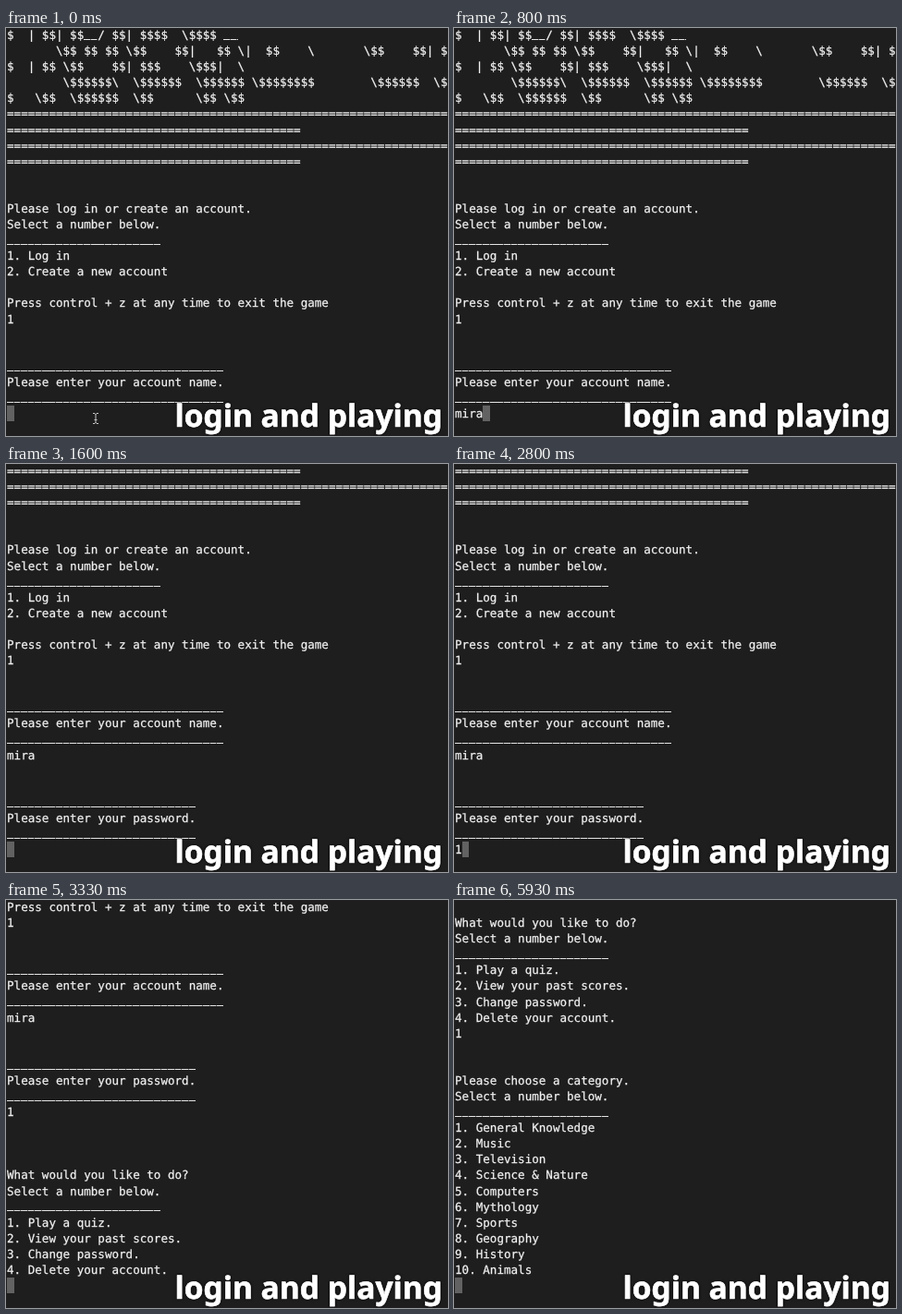
Write an HTML page that moves like this. It is 478x442 px and loops after 8000 ms.

```html
<!DOCTYPE html>
<html lang="en">
<head>
<meta charset="utf-8">
<title>Terminal quiz login</title>
<style>
  html, body { margin: 0; width: 100%; height: 100%; overflow: hidden; background: #1e1e1e; }
  #stage { position: relative; width: 478px; height: 442px; overflow: hidden; background: #1e1e1e; }
  #term {
    position: absolute; left: 1px; top: -0.92px; margin: 0;
    font: 12.57px/17.08px "DejaVu Sans Mono", monospace;
    color: #f2f2f2; -webkit-text-stroke: 0.25px #f2f2f2; text-rendering: geometricPrecision;
  }
  /* underscores sit near the baseline, with a small gap between them */
  #term u {
    text-decoration: none; color: transparent; -webkit-text-stroke: 0;
    background: repeating-linear-gradient(90deg, #e4e4e4 0 6.7px, #777 6.7px 7.57px) 0 11.9px / 100% 1.4px no-repeat;
  }
  #term i { display: inline-block; width: 7.5px; height: 17px; vertical-align: top; background: #626262; }
  svg { position: absolute; left: 0; top: 0; }
  #title {
    font: bold 33.5px "Noto Sans", sans-serif; fill: #fff;
    stroke: #fff; stroke-width: 0.7px; stroke-linejoin: round;
    filter: drop-shadow(0 0 1.5px #000); text-rendering: geometricPrecision;
  }
  #mouse { fill: none; stroke: #c8c8c8; }
</style>
</head>
<body>
<div id="stage">
  <pre id="term"></pre>
  <svg width="478" height="442">
    <path id="mouse" d="M94 417.5h2l1 1 1-1h2M97 418v10M94 428.5h2l1-1 1 1h2M95.5 424.5h3"/>
    <text id="title" x="182.5" y="431.5">login and playing</text>
  </svg>
</div>
<script>
const LOOP = 8000, ROWS = 24;
const rule = n => '_'.repeat(n);
const wide = ['='.repeat(63), '='.repeat(42)];
const select = ['Select a number below.', rule(22)];
const numbered = names => names.map((name, i) => `${i + 1}. ${name}`);
const ask = (what, answer) => {
  const text = `Please enter your ${what}.`;
  return [rule(text.length), text, rule(text.length), answer];
};

const banner = String.raw`$  | $$| $$__/ $$| $$$$  \$$$$ __
       \$$ $$ $$ \$$    $$|   $$ \|  $$    \       \$$    $$| $
$  | $$ \$$    $$| $$$    \$$$|  \
        \$$$$$$\  \$$$$$$  \$$$$$$ \$$$$$$$$        \$$$$$$  \$
$   \$$  \$$$$$$  \$$      \$$ \$$`.split('\n');

const lines = [
  ...banner, ...wide, ...wide, '', '',
  'Please log in or create an account.', ...select,
  ...numbered(['Log in', 'Create a new account']), '',
  'Press control + z at any time to exit the game', '1', '', '',
  ...ask('account name', 'mira'), '', '',
  ...ask('password', '1'), '', '', '',
  'What would you like to do?', ...select,
  ...numbered(['Play a quiz.', 'View your past scores.', 'Change password.', 'Delete your account.']),
  '1', '', '',
  'Please choose a category.', ...select,
  ...numbered(['General Knowledge', 'Music', 'Television', 'Science & Nature', 'Computers',
    'Mythology', 'Sports', 'Geography', 'History', 'Animals']),
  ''
];

// [start in ms, caret line, characters typed on it]
const steps = [
  [0, 24, 0], [600, 24, 1], [667, 24, 2], [733, 24, 3], [800, 24, 4],
  [1530, 25, 0], [1600, 30, 0], [2800, 30, 1],
  [3200, 31, 0], [3265, 34, 0], [3330, 41, 0], [5070, 41, 1], [5930, 57, 0]
];

const term = document.getElementById('term');
const mouse = document.getElementById('mouse');
let shown;

function draw() {
  const t = performance.now() % LOOP;
  const step = steps.findLast(([start]) => start <= t);
  if (step !== shown) {
    shown = step;
    const [start, row, typed] = step;
    const text = [...lines.slice(row - ROWS, row), lines[row].slice(0, typed)].join('\n');
    term.innerHTML = text.replace(/&/g, '&amp;').replace(/_+/g, '<u>$&</u>') + '<i></i>';
    mouse.style.display = start < 600 ? '' : 'none';
  }
  requestAnimationFrame(draw);
}
draw();
</script>
</body>
</html>
```
